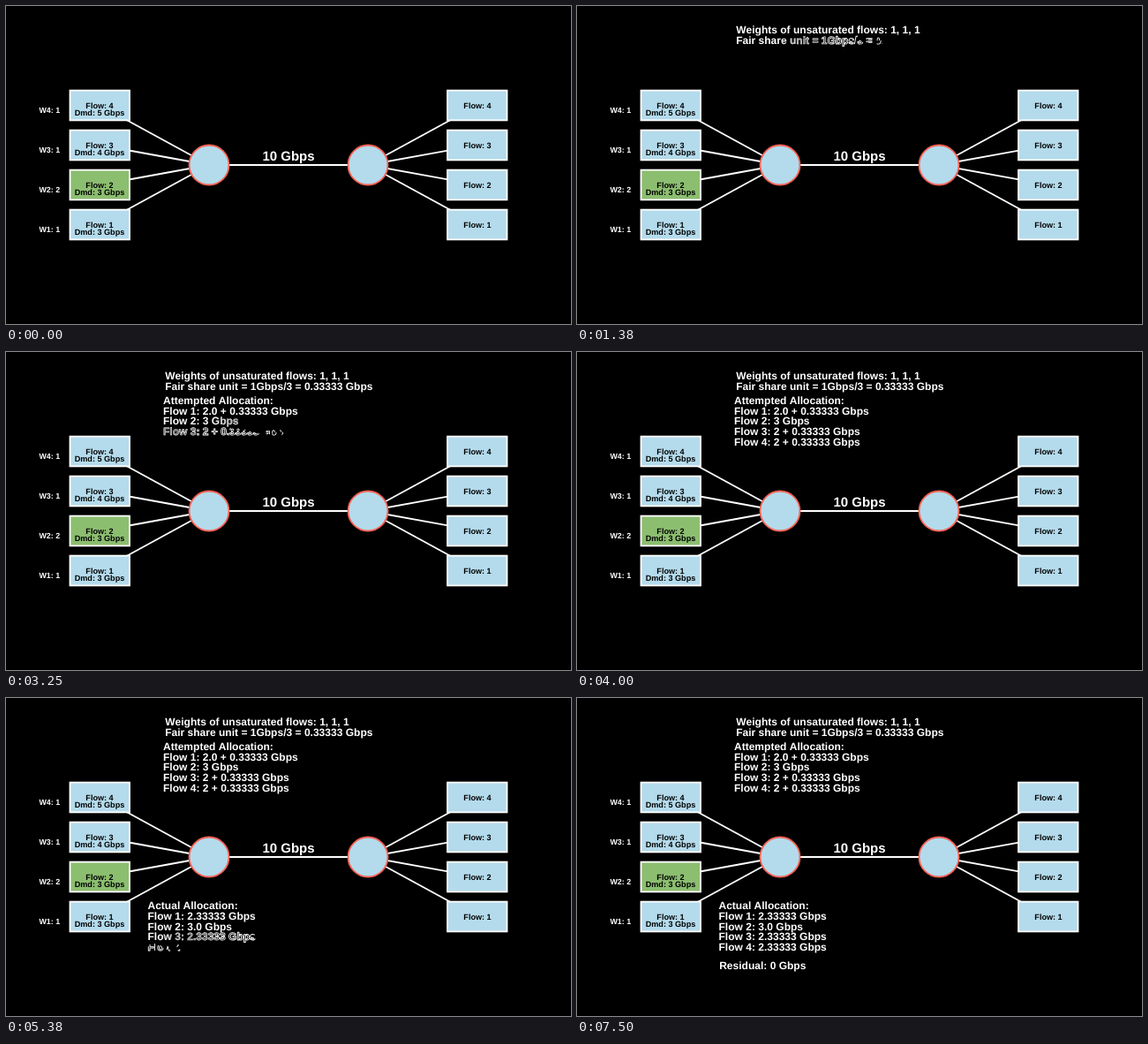
Animation of 640x360 px, one loop 9130 ms. Source, as an HTML page:

```html
<!DOCTYPE html>
<html lang="en">
<head>
<meta charset="utf-8">
<title>Weighted fair sharing</title>
<style>
  html, body { margin: 0; width: 100%; height: 100%; overflow: hidden; background: #000; }
  svg { display: block; width: 640px; height: 360px; background: #000; }
  text {
    font-family: "Liberation Sans", Arial, sans-serif;
    font-weight: bold;
    font-kerning: none;
    text-rendering: geometricPrecision;
    white-space: pre;
    fill: #fff;
  }
  .mid { text-anchor: middle; }
  .label { font-size: 9.1px; fill: #000; }
  .weight { font-size: 8.9px; }
  .rate { font-size: 15px; }
  .note { font-size: 12px; stroke: #fff; }
  line, rect { stroke: #fff; stroke-width: 1.8; }
  rect, circle { fill: #b4dbec; }
  circle { stroke: #fc6255; stroke-width: 1.8; }
  .done { fill: #8cbe70; }
</style>
</head>
<body>
<svg id="stage" viewBox="0 0 640 360"></svg>
<script>
const LOOP = 9130;
const stage = document.getElementById('stage');

function add(tag, attrs, parent = stage, content = '') {
  const el = document.createElementNS('http://www.w3.org/2000/svg', tag);
  for (const key in attrs) el.setAttribute(key, attrs[key]);
  el.textContent = content;
  return parent.appendChild(el);
}
const put = (cls, x, y, content) => add('text', { class: cls, x, y }, stage, content);
const link = (x1, y1, x2, y2) => add('line', { x1, y1, x2, y2 });

// Network
const flows = [
  { id: 4, demand: 5, weight: 1 },
  { id: 3, demand: 4, weight: 1 },
  { id: 2, demand: 3, weight: 2, done: true },
  { id: 1, demand: 3, weight: 1 }
];
const LEFT = 106.25, RIGHT = 533.75, HUBS = [230, 410];
const rowY = i => 112.5 + 45 * i;

function box(x, y, cls) {
  add('rect', { x: x - 33.75, y: y - 16.9, width: 67.5, height: 33.8, class: cls });
}

flows.forEach((f, i) => {
  link(LEFT, rowY(i), HUBS[0], 180);
  link(HUBS[1], 180, RIGHT, rowY(i));
});
link(HUBS[0], 180, HUBS[1], 180);
for (const cx of HUBS) add('circle', { cx, cy: 180, r: 22.5 });

flows.forEach((f, i) => {
  const y = rowY(i);
  box(LEFT, y, f.done ? 'done' : '');
  box(RIGHT, y, '');
  put('label mid', 106, y + 3.2, `Flow: ${f.id}`);
  put('label mid', 106, y + 11.7, `Dmd: ${f.demand} Gbps`);
  put('label mid', 534, y + 3.2, `Flow: ${f.id}`);
  put('weight mid', 49.3, y + 8, `W${f.id}: ${f.weight}`);
});
put('rate mid', 320, 175.2, '10 Gbps');

// Notes written letter by letter
const notes = [
  { start: 0, time: 2000, x: 180.2, y: 31, lines: [
    'Weights of unsaturated flows: 1, 1, 1',
    'Fair share unit = 1Gbps/3 = 0.33333 Gbps'] },
  { start: 2000, time: 2000, x: 178, y: 58.8, lines: [
    'Attempted Allocation:',
    'Flow 1: 2.0 + 0.33333 Gbps',
    'Flow 2: 3 Gbps',
    'Flow 3: 2 + 0.33333 Gbps',
    'Flow 4: 2 + 0.33333 Gbps'] },
  { start: 4000, time: 2000, x: 160.5, y: 239, lines: [
    'Actual Allocation:',
    'Flow 1: 2.33333 Gbps',
    'Flow 2: 3.0 Gbps',
    'Flow 3: 2.33333 Gbps',
    'Flow 4: 2.33333 Gbps'] },
  { start: 6000, time: 1000, x: 161.2, y: 307.2, lines: ['Residual: 0 Gbps'] }
];

for (const note of notes) {
  note.glyphs = [];
  note.lines.forEach((line, i) => {
    const row = put('note', note.x, note.y + 11.8 * i, '');
    for (const ch of line) {
      const el = add('tspan', {}, row, ch);
      if (ch === ' ') continue;
      const outline = /[.,:]/.test(ch) ? 8 : 6 * el.getComputedTextLength();
      note.glyphs.push({ el, outline });
    }
  });
  note.lag = Math.min(4 / (note.glyphs.length + 1), 0.2);
}

const clamp = v => Math.max(0, Math.min(1, v));

// First half traces the outline, second half fades it into the fill.
function drawGlyph({ el, outline }, a) {
  const trace = clamp(a * 2), fill = clamp(a * 2 - 1);
  el.style.strokeDasharray = trace < 1 ? `${trace * outline} 200` : 'none';
  el.style.strokeWidth = 0.9 * (1 - fill);
  el.style.strokeOpacity = trace > 0 && fill < 1 ? 1 : 0;
  el.style.fillOpacity = fill;
}

function render(ms) {
  for (const { start, time, glyphs, lag } of notes) {
    const p = clamp((ms - start) / time) * (1 + (glyphs.length - 1) * lag);
    glyphs.forEach((g, i) => drawGlyph(g, clamp(p - i * lag + 1e-9)));
  }
}

// Eight pictures per second, each start rounded to 10 ms
function stepTime(ms) {
  return Math.floor(ms / 250) * 250 + (ms % 250 >= 130 ? 125 : 0);
}

const origin = performance.now();
let shown = -1;
function tick() {
  const ms = stepTime((performance.now() - origin) % LOOP);
  if (ms !== shown) render(shown = ms);
  requestAnimationFrame(tick);
}
tick();
</script>
</body>
</html>
```
